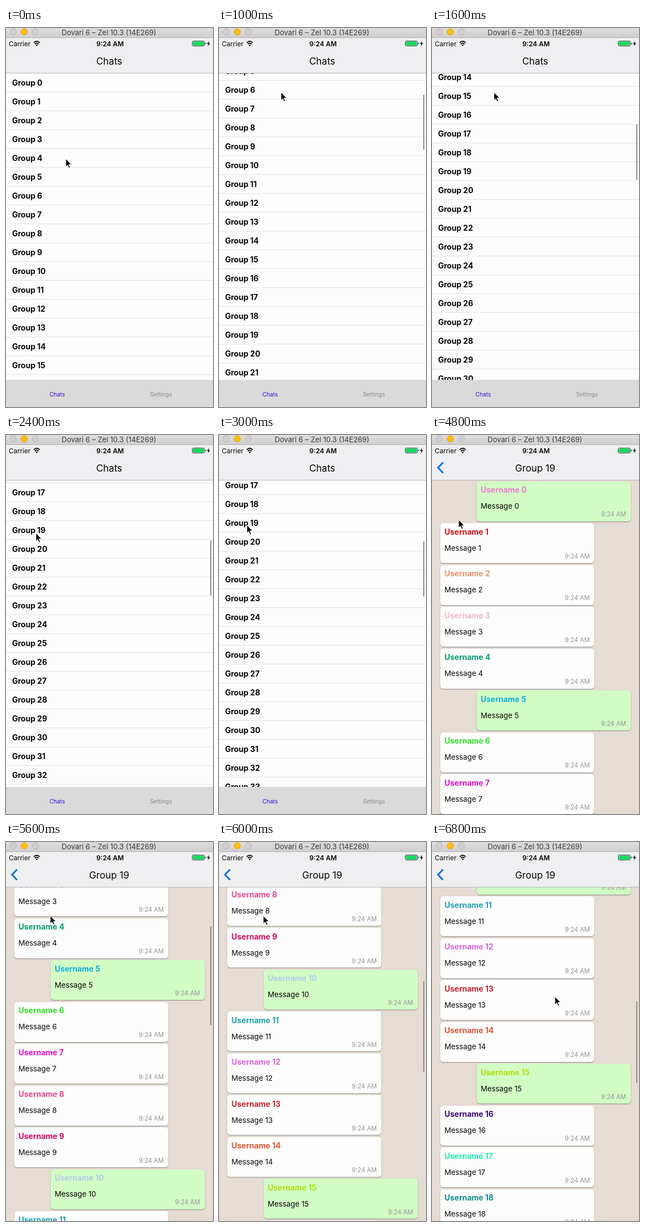
An HTML page that plays this animation: 374x684 px, repeating every 7000 ms.

```html
<!DOCTYPE html>
<html lang="en">
<head>
<meta charset="utf-8">
<title>Chats</title>
<style>
  html, body { margin: 0; width: 100%; height: 100%; overflow: hidden; }
  body { position: relative; background: #fdfdfd; font-family: Inter, Roboto, sans-serif; color: #060606; }
  div, span, svg { position: absolute; }
  span { line-height: 20px; height: 20px; margin-top: -10px; white-space: nowrap; }
  .mid { transform: translateX(-50%); }
  #stage { left: 0; top: 0; width: 374px; height: 684px; overflow: hidden; }
  #bar { width: 374px; height: 17px; background: linear-gradient(#dedcdc, #d0cece); border-bottom: 1px solid #b4b2b2; }
  #bar span { left: 186px; top: 7.5px; font-size: 13px; color: #3a3a3a; }
  #head { top: 18px; width: 374px; height: 63px; background: #efeff1; border-bottom: 1px solid #b6b6b6; }
  #head .title { left: 186.5px; top: 41.5px; font-size: 17.2px; }
  .page { top: 82px; width: 374px; height: 602px; overflow: hidden; }
  #list { background: #fdfdfd; }
  #chat { background: #e5dcd3; }
  .row { width: 374px; height: 33px; border-bottom: 1px solid #e2e2e6; }
  .row span, .name { font-size: 14px; font-weight: 700; }
  .row span { left: 11px; top: 17px; }
  .row.on { background: #d9d9d9; border-color: #c8c8c8; }
  #tabs { top: 553px; width: 374px; height: 49px; background: #dadada; }
  #tabs span { top: 26px; font-size: 10.3px; }
  .msg { width: 278px; height: 72px; border-radius: 5px; background: #fdfdfd; box-shadow: 0 1px 1.5px #8c8a88; }
  .msg.own { background: #d2fcc4; }
  .msg span { left: 7.5px; }
  .name { top: 15.5px; }
  .body { top: 44.5px; font-size: 13.3px; }
  .msg .time { left: auto; right: 8px; top: 59.5px; font-size: 11.2px; color: #949494; }
  .thumb { left: 368.5px; width: 2.5px; border-radius: 2px; background: #8e8c8a; }
</style>
</head>
<body>
<div id="stage">
  <div id="list" class="page">
    <div id="rows"></div>
    <div id="listThumb" class="thumb"></div>
    <div id="tabs">
      <span class="mid" style="left:92.5px;color:#3a0cd8">Chats</span>
      <span class="mid" style="left:280px;color:#8a8a8a">Settings</span>
    </div>
  </div>
  <div id="chat" class="page">
    <div id="msgs"></div>
    <div id="chatThumb" class="thumb"></div>
  </div>
  <div id="head">
    <span style="left:5px;top:10.5px;font-size:12px">Carrier</span>
    <span class="mid" style="left:188px;top:10.5px;font-size:12px;font-weight:600">9:24 AM</span>
    <svg width="374" height="63" fill="none">
      <g stroke="#060606" stroke-width="1.7">
        <path d="M50 8.6Q55.5 3.4 61 8.6M52 11.1Q55.5 7.6 59 11.1"/>
        <path d="M55.5 15l-2-2.2q2-1.6 4 0z" fill="#060606" stroke="none"/>
      </g>
      <rect x="336.5" y="5.5" width="22" height="9" rx="2" stroke="#3c3c3c"/>
      <rect x="337.5" y="6.5" width="20" height="7" rx="1" fill="#10d85c"/>
      <path d="M360 8v4q1.5-.6 1.5-2T360 8z" fill="#3c3c3c"/>
      <path d="M367 5.5l-4 5h2.6l-1 4.5 4.2-5.6h-2.6z" fill="#060606"/>
      <path id="back" d="M20 31.5L11 41L20 50.5" stroke="#0a6ce8" stroke-width="3"/>
    </svg>
    <span id="listTitle" class="title mid">Chats</span>
    <span id="chatTitle" class="title mid">Group 19</span>
  </div>
  <div id="bar">
    <svg width="70" height="17" stroke="#b8b6b6">
      <circle cx="13" cy="7" r="5.7" fill="#d0cece"/>
      <circle cx="33" cy="7" r="5.7" fill="#ffbe10" stroke="#e0a410"/>
      <circle cx="53" cy="7" r="5.7" fill="#d0cece"/>
    </svg>
    <span class="mid">Dovari 6 – Zel 10.3 (14E269)</span>
  </div>
  <svg id="cursor" width="16" height="22" viewBox="-2 -2 16 22">
    <path d="M0 0V14.5L3.3 11.4L5.7 17L8 16L5.6 10.5H10.2Z" fill="#000" stroke="#fff" stroke-width="1"/>
  </svg>
</div>
<script>
const LOOP = 7000, STEP = 200, WIDTH = 374, DECAY = 447;
const ROW = 34, MSG = 75.5, PUSH = 4000;
const $ = id => document.getElementById(id);
const clamp = v => Math.min(1, Math.max(0, v));

const colors = ('ec7cd0 d01010 ee9274 f4b4c8 089a70 10b0dc 30e028 e010c8 e84890 d00860 ' +
  'b4ccec 20a0b0 d866d8 c82428 e05438 b0e010 380870 20f0a8 108890').split(' ');

$('rows').innerHTML = Array.from({ length: 36 }, (_, i) =>
  `<div class="row" style="top:${i * ROW}px"><span>Group ${i}</span></div>`).join('');

$('msgs').innerHTML = colors.map((c, i) => {
  const own = i % 5 === 0;
  return `<div class="msg${own ? ' own' : ''}" style="left:${own ? 80.5 : 15}px;top:${1.5 + i * MSG}px">
    <span class="name" style="color:#${c}">Username ${i}</span>
    <span class="body">Message ${i}</span><span class="time">9:24 AM</span></div>`;
}).join('');

// A drag that speeds up until release, then glides on at the same speed to a stop.
const PULL = 3;
function flick(end, drag, release) {
  const rest = end - drag, time = PULL * drag * DECAY / rest;
  return {
    start: release - time,
    release,
    at: t => t < release
      ? drag * clamp((t - release + time) / time) ** PULL
      : end - rest * Math.exp((release - t) / DECAY)
  };
}
const listFlick = flick(590.3, 120, 927);
const chatFlick = flick(857.6, 197, 5564);

// Rows: key, value a, value b, power of the ease into the row.
function track(rows, k) {
  const i = rows.findIndex(r => r[0] > k);
  if (i < 1) return (i ? rows[rows.length - 1] : rows[0]).slice(1, 3);
  const p = rows[i - 1], q = rows[i];
  const f = ((k - p[0]) / (q[0] - p[0])) ** (q[3] || 1);
  return [1, 2].map(j => p[j] + (q[j] - p[j]) * f);
}
const pointer = [
  [0, 108, 236], [listFlick.start, 111, 236], [listFlick.release, 112, 116, PULL],
  [1600, 112, 116], [2400, 54, 177], [3400, 48, 153],
  [4800, 48, 153], [chatFlick.start, 72, 330], [chatFlick.release, 80, 133, PULL],
  [6000, 80, 133], [6800, 222, 279]
];
const listBar = [[0, 3, 100], [486, 92, 100], [573, 108, 100], [590, 111, 100]];
const chatBar = [[0, 2, 190], [608.5, 169, 164], [816, 205, 148]];

const move = (el, x, y) => { el.style.transform = `translate(${x}px,${y}px)`; };

function setBar(el, rows, scroll, alpha) {
  const [top, height] = track(rows, scroll);
  Object.assign(el.style, { top: top + 'px', height: height + 'px', opacity: alpha });
}

function draw(t) {
  const push = 1 - (1 - clamp((t - PUSH) / 500)) ** 3;
  const listY = Math.round(listFlick.at(t));
  const chatY = Math.round(chatFlick.at(t) * 2) / 2;

  move($('rows'), 0, -listY);
  move($('msgs'), 0, -chatY);
  setBar($('listThumb'), listBar, listY, t > listFlick.start ? clamp((3700 - t) / 300) : 0);
  setBar($('chatThumb'), chatBar, chatY, t > chatFlick.start ? 1 : 0);

  move($('list'), -0.3 * WIDTH * push, 0);
  move($('chat'), WIDTH * (1 - push), 0);
  $('rows').children[19].classList.toggle('on', t >= PUSH);
  $('listTitle').style.opacity = t < PUSH ? 1 : 0;
  $('chatTitle').style.opacity = $('back').style.opacity = push;
  $('chatTitle').style.marginLeft = 150 * (1 - push) + 'px';

  const [x, y] = track(pointer, t);
  move($('cursor'), x - 2, y - 2);
}

const begin = performance.now();
function tick() {
  const t = (performance.now() - begin) % LOOP;
  draw(Math.floor(t / STEP) * STEP);
  requestAnimationFrame(tick);
}
tick();
</script>
</body>
</html>
```
